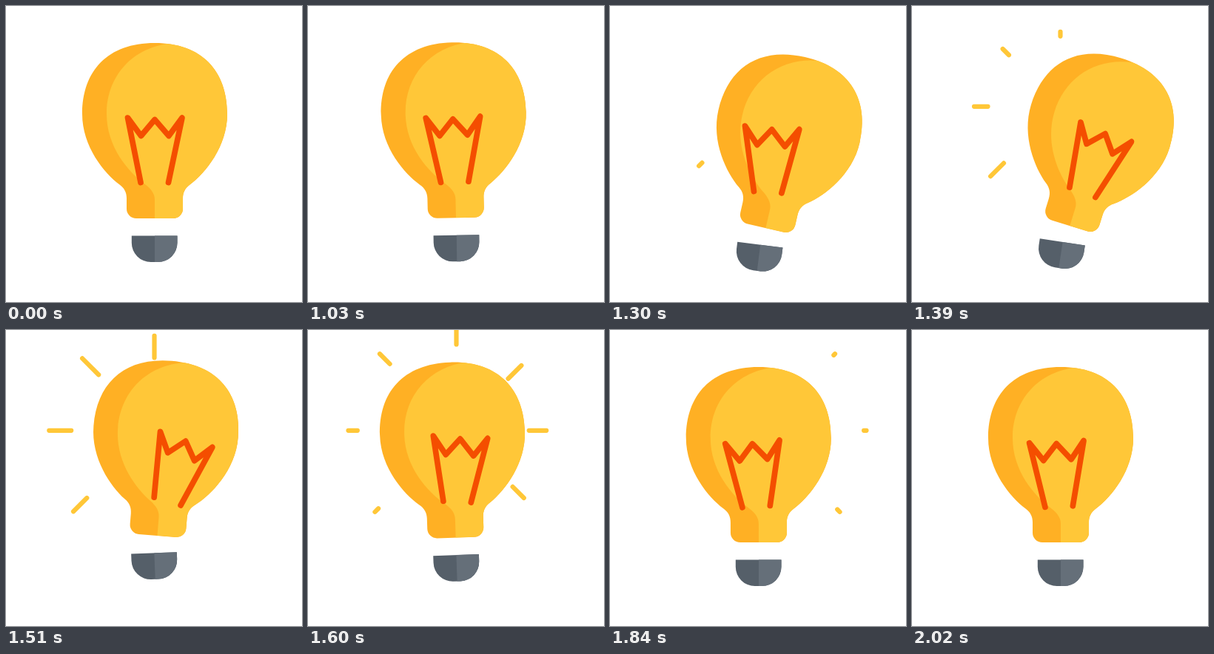
Write an HTML page that moves like this. It is 400 px wide and 400 px high and loops after 2050 ms.

```html
<!DOCTYPE html>
<html lang="en">
<head>
<meta charset="utf-8">
<title>Light bulb</title>
<style>
  html, body { margin: 0; height: 100%; overflow: hidden; background: #fff; }
  svg { display: block; width: 100vw; height: 100vh; }
</style>
</head>
<body>
<svg viewBox="0 0 400 400">
  <defs>
    <clipPath id="glass">
      <path id="outline" d="M201 50C137.500 50 103 87.500 103 146C103 190 133 226 153 241C160 246 163 252 163 260V274A13 13 0 0 0 176 287H226A13 13 0 0 0 239 274V260C239 252 242 246 249 241C269 226 299 190 299 146C299 87.500 264.500 50 201 50Z"/>
    </clipPath>
  </defs>
  <g id="rays" stroke="#ffc738" stroke-width="6.200" stroke-linecap="round"></g>
  <g id="base">
    <path fill="#555f69" d="M169.800 310.500H231.500V320A26 26 0 0 1 205.500 346H195.800A26 26 0 0 1 169.800 320Z"/>
    <path fill="#656f79" d="M201 310.500H231.500V320A26 26 0 0 1 205.500 346H201Z"/>
  </g>
  <g id="bulb">
    <use href="#outline" fill="#ffb024"/>
    <path clip-path="url(#glass)" fill="#ffc738" d="M236 49.500C176 50 136 91 136 146C136 190 165 224 188 241C197 248 201 254 201 262V300H310V40H236Z"/>
    <polyline id="filament" fill="none" stroke="#f44e00" stroke-width="7.700" stroke-linecap="round" stroke-linejoin="round" points="182,238.500 164.500,151 182.500,175.500 201,153.500 220,175.500 238,151 219.500,238.500"/>
  </g>
</svg>
<script>
const LOOP = 2050, REST = 1030, STEP = 30, START = -2;
const $ = id => document.getElementById(id);
const clamp = x => Math.min(1, Math.max(0, x));
const ease = x => (1 - Math.cos(Math.PI * clamp(x))) / 2;

// Glide from rest through turning points, each given as [step, value]
function glide(step, ...turns) {
  let time = START, value = 0, result = 0;
  for (const [end, goal] of turns) {
    result += (goal - value) * ease((step - time) / (end - time));
    [time, value] = [end, goal];
  }
  return result;
}

// Wind back, swing forward, rebound, settle
const lift = s => glide(s, [4, -3], [10, 13], [16.5, -9.5], [23, 0]);
const baseTilt = s => glide(s, [5.5, -5], [10.5, 10.3], [17, -3], [22, 0]);
const bulbTilt = s => glide(s, [5.5, -8.1], [10.5, 18.4], [19.5, -2], [28, 0]);
const wireTilt = s => glide(s, [5.5, -11], [13.2, 23], [22, -4.6], [33, -2.5]);

// Seven rays clockwise from lower left; the right-hand three follow as a later burst
const rays = Array.from({ length: 7 }, (_, i) => {
  const angle = 135 + 45 * i, sin = Math.sin(angle * Math.PI / 180);
  const line = document.createElementNS("http://www.w3.org/2000/svg", "line");
  line.setAttribute("transform", `translate(200.5 135.8) rotate(${angle})`);
  $("rays").append(line);
  return {
    line,
    radius: 98 + sin * sin * (10 + 13 * sin),
    start: i < 4 ? 8 + i : 15 + 0.3 * (i - 4)
  };
});

const travel = u => 48 * ease((u + 1.35) / 10.2);

function draw(step) {
  const y = lift(step), tilt = bulbTilt(step);
  const move = (id, angle, pivot) =>
    $(id).setAttribute("transform", `translate(0 ${y}) rotate(${angle} 200.5 ${pivot})`);
  move("base", baseTilt(step), 328);
  move("bulb", tilt, 329);
  $("filament").setAttribute("transform", `rotate(${wireTilt(step) - tilt} 201 287)`);

  for (const { line, radius, start } of rays) {
    const u = step - start, head = travel(u), tail = travel(u - 4.6);
    line.setAttribute("x1", radius + tail);
    line.setAttribute("x2", radius + head);
    line.setAttribute("visibility", u > 0.6 && head - tail > 1 ? "visible" : "hidden");
  }
}

const begin = performance.now();
function frame() {
  const t = (performance.now() - begin) % LOOP;
  draw(t < REST ? START : Math.floor((t - REST) / STEP));
  requestAnimationFrame(frame);
}
frame();
</script>
</body>
</html>
```
